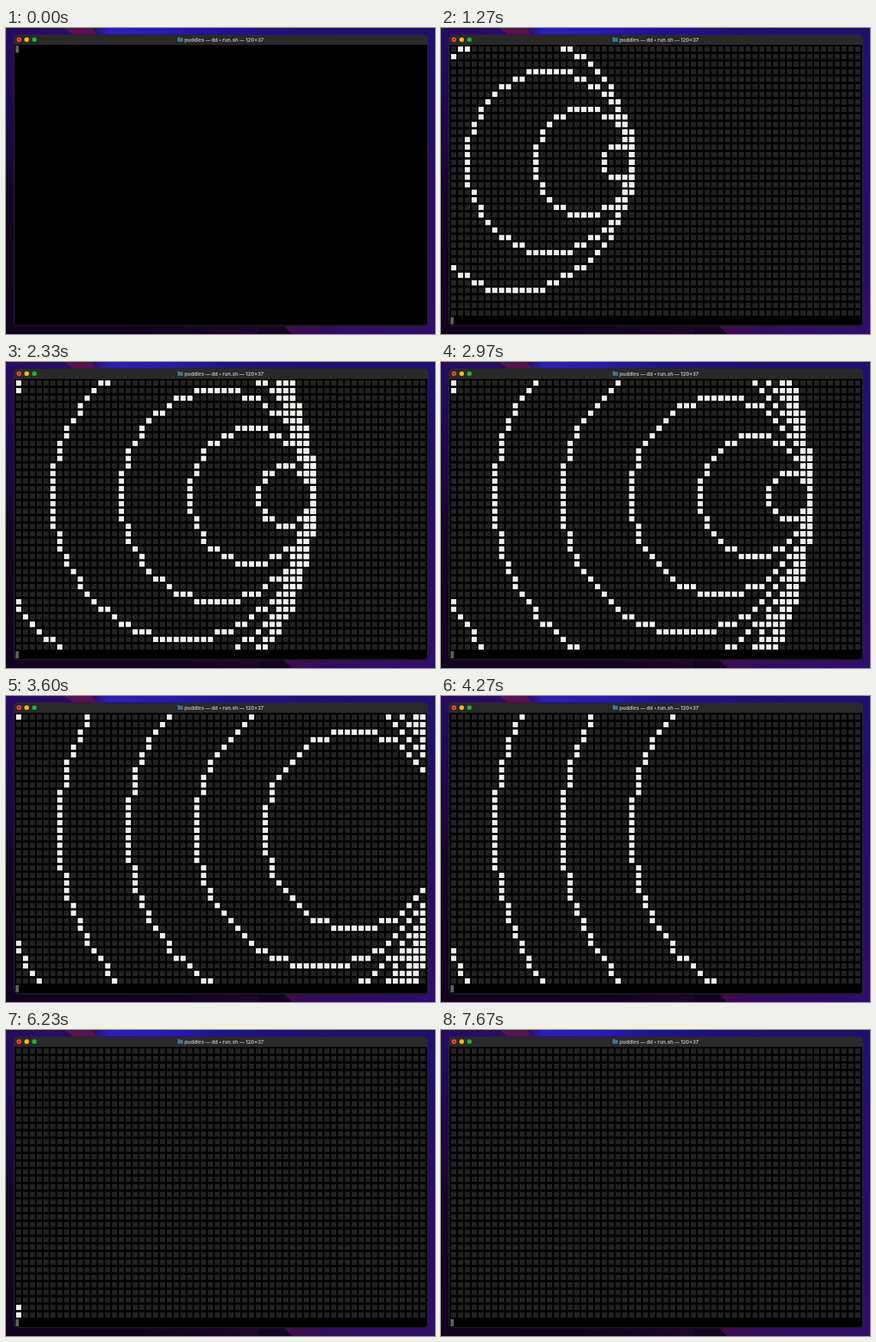
Write an HTML page with a canvas that moves like this. It is 560x400 px and loops after 7.71 s.

```html
<!DOCTYPE html>
<html lang="en">
<head>
<meta charset="utf-8">
<title>Wave fronts</title>
<style>
  html, body { margin: 0; width: 560px; height: 400px; overflow: hidden; background: #000; }
  canvas { display: block; }
</style>
</head>
<body>
<canvas id="stage" width="560" height="400"></canvas>
<script>
const W = 560, H = 400, LOOP = 7710;
const COLS = 60, ROWS = 36;
const LEFT = 12.1, TOP = 22.6, CELL_W = 8.94, CELL_H = 9.857, BLOCK = 6.8;
const START = 97, STEP = 65.5;           // first print and time per step
const FIRST_X = 9, MID_ROW = 15;         // where the emitter begins
const EMIT_EVERY = 5, LAST_EMIT = 40;

const ctx = document.getElementById('stage').getContext('2d');

function layer(draw) {
  const c = document.createElement('canvas');
  c.width = W;
  c.height = H;
  draw(c.getContext('2d'));
  return c;
}

function gradient(g, x0, y0, x1, y1, stops) {
  const fill = g.createLinearGradient(x0, y0, x1, y1);
  for (const [at, color] of stops) fill.addColorStop(at, color);
  return fill;
}

function shape(g, color, points) {
  g.fillStyle = color;
  g.beginPath();
  for (const [x, y] of points) g.lineTo(x, y);
  g.fill();
}

function disc(g, x, y, r, color) {
  g.fillStyle = color;
  g.beginPath();
  g.arc(x, y, r, 0, Math.PI * 2);
  g.fill();
}

function drawDesktop(g) {
  // left, right, bottom and top strips of the wallpaper
  g.fillStyle = gradient(g, 0, 0, 0, H,
    [[0, '#270b60'], [0.25, '#20084e'], [0.45, '#190638'], [0.55, '#140424'], [1, '#10041e']]);
  g.fillRect(0, 0, 12, H);
  g.fillStyle = gradient(g, 0, 0, 0, H,
    [[0, '#1e1070'], [0.3, '#240c68'], [0.7, '#2a0c68'], [1, '#300e6c']]);
  g.fillRect(548, 0, 12, H);
  g.fillStyle = gradient(g, 0, 0, W, 0,
    [[0, '#10041e'], [0.4, '#120422'], [0.63, '#200630'], [0.66, '#400c4c'], [0.75, '#320c60'], [1, '#300e6c']]);
  g.fillRect(0, 386, W, 14);
  shape(g, '#140424', [[330, 386], [358, 386], [374, 400], [330, 400]]);
  g.fillStyle = gradient(g, 0, 0, W, 0,
    [[0, '#270b60'], [0.2, '#2c0c66'], [0.24, '#2c20b4'], [0.36, '#281cb0'], [0.5, '#20148c'], [0.75, '#1e1074'], [1, '#1e1070']]);
  g.fillRect(0, 0, W, 12);
  shape(g, '#581250', [[76, 0], [112, 0], [121, 12], [92, 12]]);
}

function drawWindow(g) {
  g.fillStyle = '#000';
  g.beginPath();
  g.roundRect(10, 8.5, 541, 381, 5);
  g.fill();
  g.save();
  g.clip();
  g.fillStyle = '#292929';
  g.fillRect(10, 8, 541, 14);
  g.restore();
  g.strokeStyle = '#2c2a30';
  g.lineWidth = 1;
  g.beginPath();
  g.roundRect(10.5, 9, 540, 380, 5);
  g.stroke();

  disc(g, 17, 15.3, 3, '#fb4a42');
  disc(g, 17, 15.3, 1, '#6a1008');
  disc(g, 27, 15.3, 3, '#f5b820');
  disc(g, 37, 15.3, 3, '#26ad38');

  g.fillStyle = '#3c7488';
  g.fillRect(224, 12, 3, 2);
  g.fillRect(224, 13, 7, 5);
  g.fillStyle = '#b0b0b0';
  g.font = '700 6.5px Inter, "Liberation Sans", sans-serif';
  g.textBaseline = 'alphabetic';
  g.fillText('puddles — dd • run.sh — 120×37', 233, 17.6);
}

function block(g, col, row) {
  if (col < 0 || col >= COLS || row < 0 || row >= ROWS) return;
  g.fillRect(LEFT + (col + 0.5) * CELL_W - BLOCK / 2,
             TOP + (row + 0.5) * CELL_H - BLOCK / 2, BLOCK, BLOCK);
}

const backdrop = layer(g => { drawDesktop(g); drawWindow(g); });
const dimGrid = layer(g => {
  g.fillStyle = '#222224';
  for (let row = 0; row < ROWS; row++)
    for (let col = 0; col < COLS; col++) block(g, col, row);
});

// One-cell-thin circle: walk an octant and mirror it.
function ring(cx, cy, r) {
  for (let b = 0; b <= r; b++) {
    const a = Math.round(Math.sqrt(r * r - b * b));
    if (a < b) break;
    for (const sx of [-1, 1]) {
      for (const sy of [-1, 1]) {
        block(ctx, cx + sx * a, cy + sy * b);
        block(ctx, cx + sx * b, cy + sy * a);
      }
    }
  }
}

function drawCursor(row) {
  ctx.fillStyle = '#606060';
  ctx.fillRect(12.5, TOP + 0.4 + row * CELL_H, 4.2, 9.4);
}

function render(ms) {
  ctx.drawImage(backdrop, 0, 0);
  if (ms < START) {
    drawCursor(0);
    return;
  }
  const step = Math.floor((ms - START) / STEP);
  ctx.drawImage(dimGrid, 0, 0);
  ctx.fillStyle = '#f2f1ee';
  for (let born = 0; born <= Math.min(step, LAST_EMIT); born += EMIT_EVERY)
    ring(FIRST_X + born, MID_ROW, step - born);
  drawCursor(ROWS);
}

const began = performance.now();
function tick() {
  render((performance.now() - began) % LOOP);
  requestAnimationFrame(tick);
}
tick();
</script>
</body>
</html>
```
